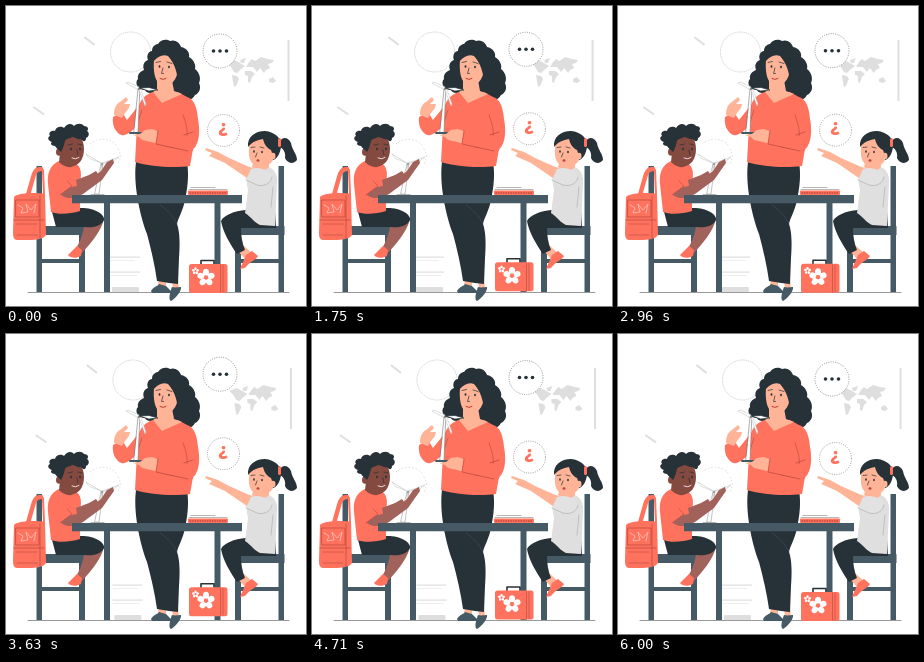
An HTML page with a canvas that plays this animation: 300x300 px, repeating every 6.04 s.

```html
<!DOCTYPE html>
<html lang="en">
<head>
<meta charset="utf-8">
<title>Wind power lesson</title>
<style>
html, body { margin: 0; width: 100%; height: 100%; overflow: hidden; background: #fff; }
canvas { display: block; width: 300px; height: 300px; }
</style>
</head>
<body>
<canvas id="stage" width="300" height="300"></canvas>
<script>
const ctx = document.getElementById('stage').getContext('2d');
const LOOP = 6040, STEP = 40;
const CORAL = '#ff725e', DARK = '#263238', STEEL = '#455a64', GREY = '#dedede';
const SKIN = '#ffb497', BROWN = '#84493f', TAN = '#a0625a', RED = '#b9483b', WHITE = '#fff';

function shape(d, fill, stroke, width = 0.7) {
  const p = new Path2D(d);
  if (fill) { ctx.fillStyle = fill; ctx.fill(p); }
  if (stroke) {
    ctx.strokeStyle = stroke;
    ctx.lineWidth = width;
    ctx.lineCap = ctx.lineJoin = 'round';
    ctx.stroke(p);
  }
}
const line = (d, color, width) => shape(d, null, color, width);

function rect(x, y, w, h, fill, r = 0) {
  ctx.fillStyle = fill;
  ctx.beginPath();
  ctx.roundRect(x, y, w, h, r);
  ctx.fill();
}

function oval(x, y, rx, ry, fill, turn = 0) {
  ctx.fillStyle = fill;
  ctx.beginPath();
  ctx.ellipse(x, y, rx, ry, turn, 0, Math.PI * 2);
  ctx.fill();
}

function ring(x, y, r, color, dash, fill) {
  ctx.save();
  ctx.setLineDash(dash);
  ctx.lineCap = 'butt';
  ctx.lineWidth = 0.6;
  ctx.strokeStyle = color;
  ctx.beginPath();
  ctx.arc(x, y, r, 0, Math.PI * 2);
  if (fill) { ctx.fillStyle = fill; ctx.fill(); }
  ctx.stroke();
  ctx.restore();
}

function shifted(x, y, draw) {
  ctx.save();
  ctx.translate(x, y);
  draw();
  ctx.restore();
}

// Offset of the backdrop: keys at every tenth of six seconds
function shake(t) {
  const keys = [0, -0.6, 1.2, -2.4, 2.4, -2.4, 2.4, -2.4, 1.2, -0.6, 0];
  const p = (t % 6000) / 600, i = Math.floor(p);
  return keys[i] + (keys[i + 1] - keys[i]) * (p - i);
}

// Linear rise and fall, 1.5 s
function float(t) {
  const p = (t % 1500) / 1500;
  return -6 * (1 - Math.abs(1 - 2 * p));
}

function backdrop() {
  ring(124.5, 46, 20, '#bbb', [1.5, 0.7]);
  line('M79 31.5L88 38.5M28 101.5L37.5 108', GREY, 2);
  rect(281.5, 34, 2, 61, GREY);
  // world map
  shape('M221 57L228 54L234 57L239 60L234 64L231 67L228 66L225 61Z', GREY);
  shape('M234 54L240 52L238 57L235 57Z', GREY);
  shape('M226 69L231 70L233 73L230 80L228 81L227 76Z', GREY);
  shape('M240 61L243 56L246 53L249 55L255 51L262 53L268 54L266 57L262 58L264 62L260 64L258 67L254 62L251 66L247 61Z', GREY);
  shape('M239 65L245 65L249 68L246 71L244 77L242 76L242 70L239 69Z', GREY);
  shape('M263 73L267 71L270 75L267 77L263 76Z', GREY);
  // items on the floor
  rect(104, 250.5, 30, 1.2, GREY);
  rect(104, 254, 25, 1, '#eee');
  rect(104, 265.5, 30, 1.2, GREY);
  rect(104, 269, 27, 1, '#eee');
  rect(106, 281, 27, 5, GREY, 1);
}

function dotsBubble() {
  ring(214, 45, 17, '#555', [1, 1.3], WHITE);
  for (const x of [207.5, 214, 220.5]) oval(x, 45, 1.8, 1.8, DARK);
}

function askBubble() {
  ring(217.5, 124.5, 16, '#666', [1, 1.3], WHITE);
  ctx.fillStyle = CORAL;
  ctx.font = '800 18px "Open Sans", Arial, sans-serif';
  ctx.textAlign = 'center';
  ctx.textBaseline = 'alphabetic';
  ctx.fillText('¿', 217, 126.5);
}

function flower(x, y, r) {
  for (let i = 0; i < 5; i++) {
    const a = i * Math.PI * 0.4 - 1.57;
    oval(x + Math.cos(a) * r * 0.62, y + Math.sin(a) * r * 0.62, r * 0.42, r * 0.36, WHITE, a);
  }
  oval(x, y, r * 0.25, r * 0.25, CORAL);
}

function suitcase() {
  line('M195 258V254.5H208V258', DARK, 1.6);
  rect(183, 258, 38.5, 29, CORAL, 2.5);
  line('M214.5 259V286M217 259V286', RED, 0.6);
  flower(200, 271.5, 8.5);
  flower(189.5, 265, 3.5);
}

function turbine(x, y, bx, by, edge) {
  shape(`M${x - 0.6} ${y}L${x + 0.8} ${y}L${bx + 2} ${by}H${bx - 2}Z`, WHITE, edge, 0.6);
  oval(x, y, 1.3, 1.3, edge);
}

function teacher() {
  // hair
  shape('M146 45C146 40 150 38 152 38C155 33 161 33 164 35C169 33 174 37 175 41C181 42 184 47 183 51C188 54 190 59 189 63C194 67 195 73 193 77C196 83 192 88 189 89C186 95 180 95 177 92C168 94 156 91 149 86C145 88 140 87 139 84C132 84 128 77 132 73C131 68 135 65 138 64C136 58 139 55 142 54C140 49 143 45 146 45Z', DARK);
  // ankles and shoes
  shape('M153 271L160 272V281H152Z', SKIN);
  shape('M166 274H172L173 283H167Z', SKIN);
  shape('M145 285C147 281 152 280 153 278L160 280L165 285V287H146Z', STEEL);
  shape('M166 281C169 282 173 281 175 281C176 285 169 293 165 295C162 294 164 286 166 281Z', STEEL);
  // trousers
  shape('M130 156H181C183 168 182 180 179 194C177 205 172 212 171 218C174 226 174 240 173 252L172 278L163 277L151 275C149 260 145 243 141 228C134 210 127 178 130 156Z', DARK);
  line('M171 218C167 209 160 203 154 199', '#46555c', 0.5);
  // jumper
  shape('M147 86C140 88 136 92 133 99L121 114L116 106L107 111C106 119 109 126 115 129C121 130 127 125 131 119L129 156C145 161 168 162 184 160L187 143C194 138 194 123 192 113C191 101 188 93 181 91L172 86Z', CORAL);
  line('M131 119L136 104M177 109C180 117 182 125 181 131M187 144L163 141', RED, 0.6);
  // neck and face
  shape('M151 74H166L168 85L176 88L156 97L147 86L151 83Z', SKIN);
  shape('M148 54C149 49 155 46 162 47C169 49 173 56 172 65C170 75 164 81 157 79C149 78 147 66 148 54Z', SKIN);
  shape('M147 56C147 49 151 45 158 45C168 43 175 51 176 62C176 69 174 74 172 76C171 66 169 58 162 50C157 48 152 50 147 56Z', DARK);
  oval(153.5, 60.5, 0.9, 1.2, DARK);
  oval(163, 61, 0.9, 1.2, DARK);
  line('M150 56.5L154.5 55.5M161 56L166 57.5M157 62L155.5 67.5H157.5', DARK, 0.7);
  line('M154 72.5Q157 74.5 160 72.5', '#b53f38', 1);
  // hands with model
  shape('M108 109C108 102 110 98 114 96L120 91L122 94L118 98L124 98L123 102L119 107L116 112Z', SKIN);
  turbine(133, 83, 130, 127, '#777');
  shape('M133 81L122 76L120 77L131 83Z', WHITE, '#bbb', 0.5);
  shape('M133 84L139 100L140 98L135 84Z', WHITE, '#bbb', 0.5);
  shape('M134 82L143 81.5L152 84L143 85Z', WHITE, DARK, 0.7);
  rect(123, 126, 17, 2, STEEL, 1);
  shape('M154 126L146 123L139 124L134 128L127 129L133 131L136 134L145 136L153 138Z', SKIN);
  shape('M152 124L177 129L187 131C193 136 189 145 182 145L150 138Z', CORAL);
  line('M152 125L150 138L182 145M178 129L187 126', RED, 0.7);
}

function backpack() {
  line('M22 189L28 168Q30 163 35 163', CORAL, 4.5);
  line('M37 164L38 188', CORAL, 2);
  shape('M8 191C11 187 30 186 39 188L40 229C38 233 30 234 22 234H11C8 234 7 231 7 227Z', CORAL);
  line('M10 194H33V211H10ZM8 214H38M34 190V232', RED, 0.7);
  line('M12 199L17 202L15 207L22 206L20 198L25 204L30 198L28 207', '#ffd0c8', 0.7);
  line('M11 218H31M11 229H31', RED, 0.6);
}

function chair(back, front) {
  rect(back, 160, 5.5, 126, STEEL);
  rect(front, 227, 6, 59, STEEL);
  const x = Math.min(back, front - 1), end = Math.max(back + 6, front + 7);
  rect(x, 220, end - x, 9, STEEL);
  rect(x + 1, 253, end - x - 2, 4, STEEL);
}

function boy() {
  shape('M79 214L98 212C97 220 90 231 83 239L75 248L69 244C75 235 78 224 79 214Z', TAN);
  shape('M71 240L76 244L75 250C70 253 64 252 62 249Z', CORAL);
  shape('M45 202H78C91 203 99 209 98 214C95 220 88 222 79 221H50Z', DARK);
  shape('M53 155C44 159 41 167 42 178L45 206C53 209 64 208 74 205L74 177C76 168 75 160 70 158Z', CORAL);
  shape('M54 147H69V159C65 163 58 161 53 156Z', BROWN);
  shape('M52 138C51 130 57 126 64 126C73 126 78 133 78 143C78 154 72 160 66 160C58 160 53 151 52 138Z', BROWN);
  oval(53, 146, 3, 3.8, BROWN);
  shape('M55 146C52 143 50 142 49 140C45 140 44 137 46 136C42 135 41 131 44 130C42 127 45 124 49 125C50 120 56 120 58 122C61 117 66 117 68 120C71 117 76 117 78 120C82 120 83 123 81 125C84 127 83 131 80 132C80 136 77 136 75 133C71 134 69 131 66 131C64 133 60 132 59 135C58 139 57 143 55 146Z', DARK);
  oval(65, 143, 0.9, 1.2, DARK);
  oval(74, 143, 0.9, 1.2, DARK);
  line('M62 139L66.5 138M72 138L76 139M71 144L72 149', DARK, 0.7);
  line('M66 152Q70 154 73 151.5', WHITE, 0.8);
  // arms and model
  shape('M70 174L83 169L90 165L93 169L89 176L72 184Z', TAN);
  turbine(96, 158, 91, 188, '#999');
  shape('M95 157L80 148L83 152Z', WHITE, '#bbb', 0.5);
  shape('M96 157L113 151L106 156Z', WHITE, '#bbb', 0.5);
  shape('M96 159L93 171L92 168Z', WHITE, '#bbb', 0.5);
  line('M85 188.5H98', '#999', 0.7);
  shape('M51 183L66 181L79 178L95 165L101 156L107 153L108 157L103 164L96 174L77 188C66 194 56 194 51 183Z', TAN);
  shape('M46 167C52 164 58 168 61 175L66 180L54 189C48 187 45 182 44 176Z', CORAL);
  line('M61 175L66 180L54 189', RED, 0.6);
  ctx.save();
  ctx.setLineDash([1, 2.5]);
  line('M84 138C92 131 104 132 110 139M112 143C115 148 115 153 112 158', '#ccc', 0.6);
  ctx.restore();
}

function girl() {
  shape('M230 243L238 240L247 248L241 255Z', SKIN);
  shape('M240 249L246 245L252 250C250 254 243 256 239 262L234 263Z', CORAL);
  shape('M269 204H240C228 205 218 209 215 215C217 226 224 238 231 248L239 244C236 237 235 229 235 222H270Z', DARK);
  shape('M246 162C239 165 240 174 242 184L239 207C245 211 249 217 254 219L269 220L271 177C272 167 267 162 260 160Z', '#dfdfdf');
  shape('M248 153H263V161C259 166 250 166 246 161Z', SKIN);
  // ponytail
  shape('M273 137C276 130 282 131 285 137C286 144 291 148 291 154C287 159 281 157 279 152C280 146 277 142 273 141Z', DARK);
  shape('M243 143C243 133 249 129 258 130C267 131 271 140 269 150C266 159 259 162 252 161C245 159 242 152 243 143Z', SKIN);
  shape('M242 141C241 131 249 125 259 125C269 126 276 132 275 141C274 148 271 153 267 154C267 149 266 147 265 144C261 142 258 138 257 133C251 134 246 136 242 141Z', DARK);
  rect(272, 132, 3, 9, CORAL, 1.5);
  oval(267, 150, 2.5, 3.3, SKIN);
  oval(248, 145.5, 0.8, 1.2, DARK);
  oval(256, 146, 0.8, 1.2, DARK);
  line('M245 141.5L249 141M254 141L258 142M251 147L249.5 151', DARK, 0.7);
  oval(252, 154.5, 1.5, 1.2, '#bd443e');
  // pointing arm
  shape('M252 164L241 160L223 152L212 146L200 142L199 144L206 147L203 150L210 153L219 157L238 170L248 177Z', SKIN);
  shape('M245 163C253 160 264 164 266 171C265 178 258 181 251 179L240 174Z', '#e2e2e2');
  line('M240 174L251 179C259 181 265 177 266 171M267 181L265 201', '#aaa', 0.6);
}

function table() {
  rect(98, 196, 6, 90, STEEL);
  rect(208.5, 196, 6, 90, STEEL);
  rect(66, 189, 170, 8.3, STEEL);
  rect(182, 184.5, 40, 4.5, CORAL, 1);
  ctx.save();
  ctx.setLineDash([0.5, 2]);
  line('M184 187H221', RED, 1.5);
  ctx.restore();
  line('M185 181.5H209M183 183.5H221', '#a5a5a5', 0.8);
}

function draw(t) {
  ctx.fillStyle = WHITE;
  ctx.fillRect(0, 0, 300, 300);
  const dy = float(t);
  shifted(shake(t), 0, backdrop);
  line('M22 286.5H283', '#555', 0.6);
  shifted(0, dy, dotsBubble);
  shifted(0, dy, askBubble);
  teacher();
  chair(30.5, 73);
  chair(272.5, 229);
  boy();
  girl();
  backpack();
  table();
  shifted(0, dy, suitcase);
}

function frame() {
  const t = performance.now() % LOOP;
  draw(Math.floor(t / STEP) * STEP);
  requestAnimationFrame(frame);
}
frame();
</script>
</body>
</html>
```
